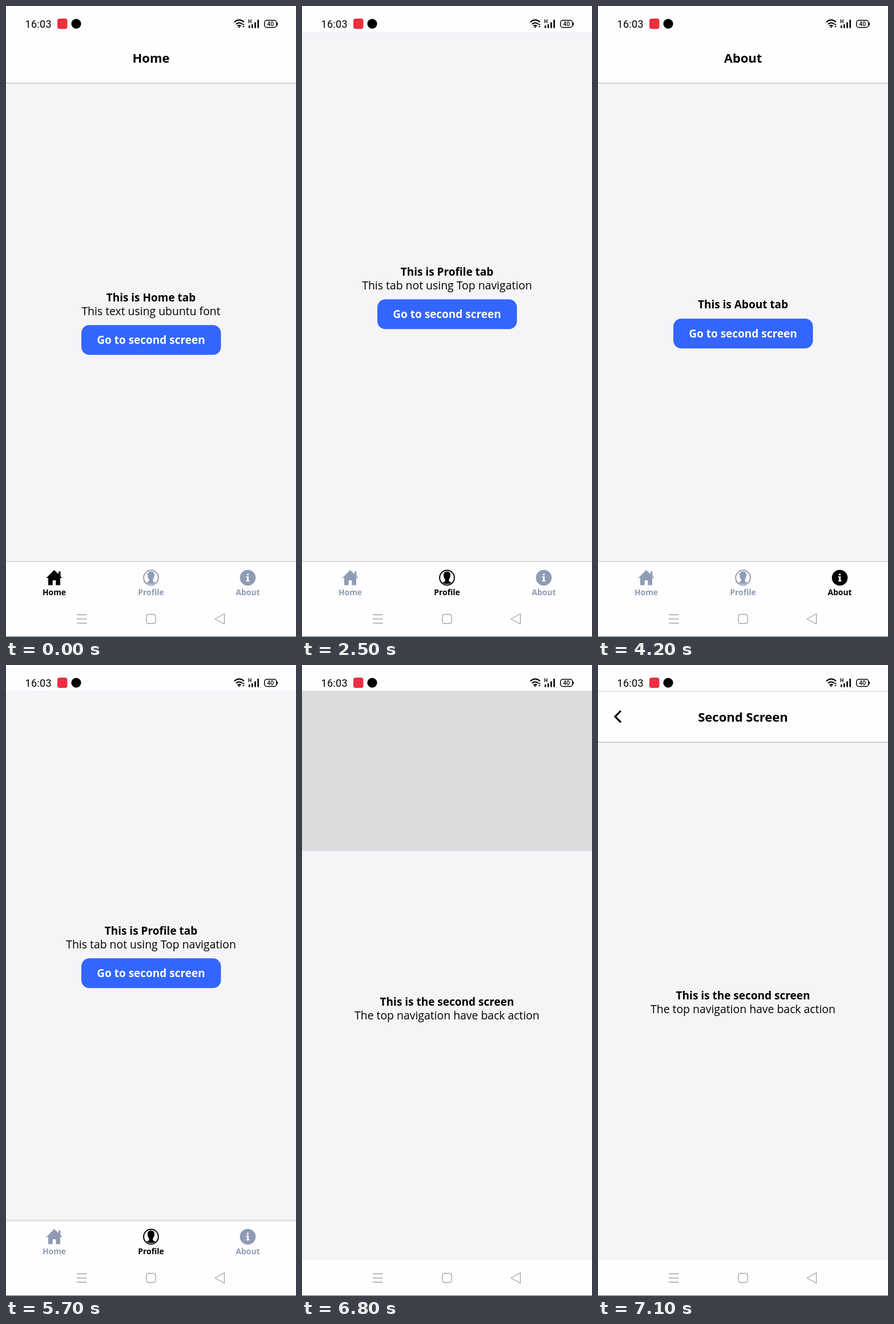
An HTML page that plays this animation: 508x1102 px, repeating every 8 s.

```html
<!DOCTYPE html>
<html lang="en">
<head>
<meta charset="utf-8">
<title>Tab navigation</title>
<style>
  html, body { margin: 0; width: 100%; height: 100%; overflow: hidden; background: #fefdff; }
  #stage { display: block; width: 100%; height: 100%; }
  text { font: 400 19.4px "Open Sans", "Noto Sans", sans-serif; text-anchor: middle; fill: #000; }
  .bold { font-size: 19px; font-weight: 700; }
  .title { font-size: 22px; font-weight: 700; }
  .label { font-size: 13.9px; font-weight: 700; fill: inherit; }
  .light { fill: #fff; }
  .clock { font: 400 18px Roboto, sans-serif; letter-spacing: .3px; text-anchor: start; }
  .tiny { font: 500 10.5px Roboto, sans-serif; }
  .net { font: 700 8.5px Roboto, sans-serif; }
  .line { fill: none; stroke: #000; }
  .keys { fill: none; stroke: #a3a2a6; stroke-width: 1.4; stroke-linejoin: round; }
</style>
</head>
<body>
<svg id="stage" viewBox="0 0 508 1102">
  <rect width="508" height="1102" fill="#fefdff"/>

  <svg y="45" width="508" height="994">
    <g id="under"></g>
    <rect id="shade" width="508" height="994" opacity="0"/>
    <svg id="sheet" y="994" width="508" height="994"><g id="card"></g></svg>
  </svg>

  <g id="status">
    <text class="clock" x="33.5" y="38">16:03</text>
    <rect x="90" y="22" width="17.5" height="18" rx="4" fill="#f02d43"/>
    <circle cx="123" cy="31" r="8.6"/>
    <g class="line" stroke-width="2.1">
      <path d="M400 28.2Q408.5 20.6 417 28.2M403 31.8Q408.5 27 414 31.8M405.6 35Q408.5 32.6 411.4 35"/>
      <rect x="452.8" y="25" width="21" height="12.4" rx="4" stroke-width="1.5"/>
      <path d="M475.2 29v4.5" stroke-width="1.6"/>
    </g>
    <path d="M406.3 35.8h4.4l-2.2 2.6zM414 33.2l2-2.6 2 2.6zM414 35l2 2.6 2-2.6z"/>
    <path d="M425 34h2.6v4.5H425zM430 32h2.6v6.5H430zM435.2 28.5h2.6v10h-2.6zM440.4 24h2.6v14.5h-2.6z"/>
    <text class="net" x="427.3" y="30">H</text>
    <text class="tiny" x="463.2" y="35">40</text>
  </g>

  <g class="keys">
    <path d="M124 1063.3h17.5M124 1070.5h17.5M124 1077.7h17.5"/>
    <rect x="246" y="1062.5" width="16" height="16" rx="3.5"/>
    <path d="M366 1070.5L382.5 1061.5V1079.5z"/>
  </g>
  <rect y="1101" width="508" height="1" fill="#6b6a6d"/>
</svg>

<script>
const LOOP = 8000, TICK = 100, TOP = 45, HEIGHT = 994;
const PAGE = '#f5f4f7', WHITE = '#fefdff', IDLE = '#8f9bb3', BLUE = '#3366ff';

// Which tab is open from what time on.
const VISITS = [[0, 'Home'], [2500, 'Profile'], [4000, 'About'], [5300, 'Profile']];
const PRESS = { start: 5925, length: 150, opacity: 0.2 };
const REVEAL = { start: 6693.5, length: 457 };

const $ = id => document.getElementById(id);
const clamp = v => Math.min(1, Math.max(0, v));
const text = (cls, y, words, x = 254) => `<text class="${cls}" x="${x}" y="${y}">${words}</text>`;
const background = `<rect y="${TOP}" width="508" height="${HEIGHT}" fill="${PAGE}"/>`;

const header = words => `
  <rect y="${TOP}" width="508" height="89" fill="${WHITE}"/>
  <rect y="134" width="508" height="1.5" fill="#c3c2c6"/>
  ${text('title', 98.5, words)}`;

const button = y => `<g class="button">
  <rect x="132" y="${y}" width="244.5" height="52" rx="14" fill="${BLUE}"/>
  ${text('bold light', y + 33, 'Go to second screen')}</g>`;

const SCREENS = {
  Home: header('Home') + text('bold', 515.5, 'This is Home tab') +
    text('', 539.5, 'This text using ubuntu font') + button(557.3),
  Profile: text('bold', 470.5, 'This is Profile tab') +
    text('', 494.5, 'This tab not using Top navigation') + button(512.3),
  About: header('About') + text('bold', 527.5, 'This is About tab') + button(546)
};

const ICONS = {
  Home: [84.5, `<path d="M84.5 985L92 992.3V987.5H95.5V995.8L98.5 999H95V1011.5H87.3V1003H81.7V1011.5H74V999H70.5z"/>`],
  Profile: [254, `<circle cx="254" cy="998.5" r="12.9" fill="none" stroke="currentColor" stroke-width="2"/>
    <path d="M254 987.8C258.5 987.8 260.4 990.5 260 994.5C259.8 997.5 258.6 1000 257.3 1001.6V1004
      C258 1006 261 1006 262.2 1007.2Q254 1012 245.8 1007.2C247 1006 250 1006 250.7 1004V1001.6
      C249.4 1000 248.2 997.5 248 994.5C247.6 990.5 249.5 987.8 254 987.8z"/>`],
  About: [423.5, `<circle cx="423.5" cy="998.5" r="13.8"/>
    <path fill="${WHITE}" d="M421.9 991.5h3.2v2.8h-3.2zM420.8 996h4.3v7h1.2v2h-5.5v-2h1.2v-5h-1.2z"/>`]
};

const tabBar = `<rect y="969.5" width="508" height="1.8" fill="#d3d2d6"/>
  <rect y="971.3" width="508" height="68" fill="${WHITE}"/>` +
  Object.entries(ICONS).map(([name, [x, shape]]) =>
    `<g id="tab${name}" fill="currentColor">${shape}${text('label', 1028.5, name, x)}</g>`).join('');

$('under').innerHTML = background +
  Object.entries(SCREENS).map(([name, body]) => `<g id="screen${name}">${body}</g>`).join('') + tabBar;

$('card').innerHTML = background + header('Second Screen') +
  '<path class="line" d="M40 80L30 90L40 100" stroke-width="3.2"/>' +
  text('bold', 583.5, 'This is the second screen') +
  text('', 607.5, 'The top navigation have back action');

const pressed = document.querySelector('#screenProfile .button');

const easeInOut = p => p < 0.5 ? 2 * p * p : 1 - 2 * (1 - p) ** 2;

function bezier(x1, y1, x2, y2) {
  const at = (s, a, b) => 3 * (1 - s) ** 2 * s * a + 3 * (1 - s) * s * s * b + s ** 3;
  return x => {
    if (x <= 0 || x >= 1) return clamp(x);
    let low = 0, high = 1;
    for (let i = 0; i < 24; i++) {
      const mid = (low + high) / 2;
      if (at(mid, x1, x2) < x) low = mid; else high = mid;
    }
    return at(low, y1, y2);
  };
}
const easeReveal = bezier(0.20833, 0.82, 0.25, 1);

function draw(t) {
  const open = VISITS.filter(([from]) => t >= from).pop()[1];
  for (const name in SCREENS) {
    $('screen' + name).style.display = name === open ? '' : 'none';
    $('tab' + name).style.color = name === open ? '#000' : IDLE;
  }

  const press = easeInOut(clamp((t - PRESS.start) / PRESS.length));
  pressed.setAttribute('opacity', 1 - (1 - PRESS.opacity) * press);

  // The sheet rises while its content counter-moves, so it seems to be uncovered.
  const shown = easeReveal(clamp((t - REVEAL.start) / REVEAL.length));
  const rest = HEIGHT * (1 - shown);
  $('sheet').setAttribute('y', rest);
  $('card').setAttribute('transform', `translate(0 ${-TOP - 0.959 * rest})`);
  $('under').setAttribute('transform', `translate(0 ${-TOP - 0.02 * HEIGHT * shown})`);
  $('shade').setAttribute('opacity', 0.1 * clamp(shown / 0.36));
}

const begin = performance.now();
function frame() {
  const t = (performance.now() - begin) % LOOP;
  draw(Math.floor(t / TICK) * TICK);
  requestAnimationFrame(frame);
}
frame();
</script>
</body>
</html>
```
